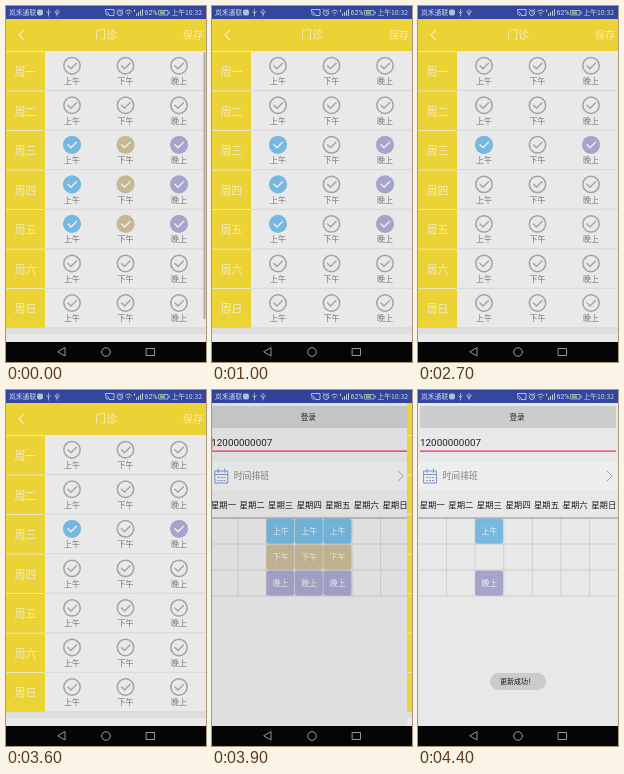
These frames come from a looping animation (200 px wide and 356 px high, 4.5 s). An HTML page:

```html
<!DOCTYPE html>
<html lang="zh-CN">
<head>
<meta charset="utf-8">
<title>门诊</title>
<style>
  html, body { margin: 0; width: 100%; height: 100%; overflow: hidden; background: #000; }
  svg { display: block; width: 100vw; height: 100vh; }
  text { font-family: "Noto Sans CJK SC", "Noto Sans CJK", "Noto Sans", sans-serif; }
  .latin { font-family: Roboto, sans-serif; }
  .line { fill: none; stroke-linecap: round; stroke-linejoin: round; }
</style>
</head>
<body>
<svg id="stage" viewBox="0 0 200 356"></svg>
<script>
const LOOP = 4500, STEP = 100;
const DAYS = [...'一二三四五六日'];
const PARTS = ['上午', '下午', '晚上'];
const COLORS = ['#76b8df', '#c5b895', '#a5a5cb'];
const YELLOW = '#ecd335', PALE = '#f3ebc4', BLUE = '#33479f';

// Taps that clear a slot: time, day, part of day
const TAPS = [
  [500, 4, 1], [700, 3, 1], [900, 2, 1],
  [1300, 3, 0], [1600, 4, 0], [1900, 4, 2], [2600, 3, 2]
];
const BACK = 3800, REFRESH = 4100, TOAST = 4200;

function add(parent, tag, attrs = {}) {
  const el = document.createElementNS('http://www.w3.org/2000/svg', tag);
  for (const key in attrs) el.setAttribute(key, attrs[key]);
  return parent.appendChild(el);
}
const rect = (p, x, y, width, height, fill, rx = 0) => add(p, 'rect', { x, y, width, height, fill, rx });
const line = (p, d, stroke, width = 1) =>
  add(p, 'path', { d, stroke, 'stroke-width': width, class: 'line' });
function text(p, str, x, y, size, fill, anchor = 'middle', more = {}) {
  const el = add(p, 'text', { x, y: y + size * 0.37, 'font-size': size, fill, 'text-anchor': anchor, ...more });
  el.textContent = str;
  return el;
}
const show = (el, on) => el.setAttribute('visibility', on ? 'inherit' : 'hidden');

const stage = document.getElementById('stage');
rect(stage, 0, 0, 200, 13, BLUE);
const home = add(stage, 'g');
const scrim = rect(stage, 0, 0, 200, 336, '#000');
const page = add(stage, 'g');
const homeCells = buildHome();
const caret = rect(home, 2, 47, 1.2, 12, '#e8487a');
const checks = buildPage();
const scrollbar = rect(page, 197.5, 46, 2, 267, '#aaa');
const toast = add(stage, 'g');
rect(toast, 72, 283, 56, 17, '#cbcbcb', 8.5);
text(toast, '更新成功！', 82, 291.5, 7, '#111', 'start', { 'font-weight': 500 });
buildBars();

function buildHome() {
  rect(home, 0, 13, 200, 323, '#e8e8e8');
  rect(home, 2, 16, 196, 22, '#cccccc', 2);
  text(home, '登录', 99, 27, 7.6, '#222', 'middle', { 'font-weight': 500 });
  text(home, '12000000007', 2, 52.5, 9.9, '#222', 'start', { class: 'latin' });
  rect(home, 2, 60.4, 196, 1.5, '#ee4a7c');
  rect(home, 0, 72, 200, 28, '#eeeeee');

  line(home, 'M6 81H18.500V93H6ZM6 84.500H18.500M9 79V82.500M15.500 79V82.500', '#7b93c3', 1);
  line(home, 'M8.500 87.500H16M8.500 90.500H16', '#7b93c3', 1.2).setAttribute('stroke-dasharray', '1 2');
  text(home, '时间排班', 24.5, 86, 8.9, '#7c7e82', 'start');
  line(home, 'M189 81L194 86L189 91', '#999', 0.9);

  const col = 200 / 7;
  DAYS.forEach((day, i) =>
    text(home, '星期' + day, (i + 0.5) * col, 115, 8.4, '#1a1a1a', 'middle', { 'font-weight': 500 }));
  for (let i = 1; i < 7; i++) line(home, `M${i * col} 128V206`, '#c9c9c9', 0.8);
  for (let j = 1; j < 4; j++) line(home, `M0 ${128 + j * 26}H200`, '#c9c9c9', 0.8);
  line(home, 'M0 128H200', '#777', 0.8);

  const cells = [];
  for (let day = 2; day < 5; day++) PARTS.forEach((label, part) => {
    const g = add(home, 'g'), y = 128.5 + part * 26;
    rect(g, day * col, y, col - 0.7, 25.3, COLORS[part], 2.5);
    text(g, label, (day + 0.5) * col, y + 13, 8, '#eef0f2');
    cells.push({ g, stays: day === 2 && part !== 1 });
  });
  return cells;
}

function buildPage() {
  rect(page, 0, 0, 200, 13, BLUE);
  rect(page, 0, 13, 200, 323, '#e9e9e9');
  rect(page, 0, 13, 200, 32, YELLOW);
  line(page, 'M17.500 24.500L13 29L17.500 33.500', PALE, 1.1);
  text(page, '门诊', 100, 29, 11, PALE);
  text(page, '保存', 187, 29.5, 10, PALE);
  rect(page, 0, 322, 200, 6, '#dfdfdf');

  const list = [], pitch = 39.55;
  DAYS.forEach((day, row) => {
    const top = 45 + row * pitch, y = top + 14.7;
    rect(page, 0, top + 0.8, 39, pitch - 0.8, YELLOW);
    text(page, '周' + day, 19.5, top + 21, 10.8, PALE);
    line(page, `M39 ${top + pitch}H200`, '#d2d2d2', 0.8);
    PARTS.forEach((label, part) => {
      const x = 66 + part * 53.5;
      const dot = add(page, 'circle', { cx: x, cy: y, 'stroke-width': 1.5 });
      const tick = line(page, `M${x - 4} ${y}l3 3l5.500 -5.500`, '#999', 1.4);
      text(page, label, x, y + 15.5, 8, '#777');
      list.push({ row, part, dot, tick });
    });
  });
  return list;
}

function buildBars() {
  const white = '#d5d9ec';
  text(stage, '岚禾通联', 3, 6.7, 6.8, white, 'start');
  rect(stage, 31, 3.5, 6, 6, '#a9c5dc', 2);
  line(stage, 'M42.500 3.500V10M40.500 5.500L42.500 7.500L44.500 5.500M51 3.500V10M49 5V6.500L51 8L53 6.500V5', white, 0.7);
  line(stage, 'M99.500 5V3.500H108V9.500H104M99.500 7.500a2 2 0 0 1 2 2M99.500 5.700a4 4 0 0 1 4 4', white, 0.8);
  add(stage, 'circle', { cx: 114, cy: 6.8, r: 2.7, fill: 'none', stroke: white, 'stroke-width': 0.8 });
  line(stage, 'M114 5.300V7H115.300M111 4L112 3M117 4L116 3', white, 0.6);
  line(stage, 'M119.500 5.500Q122.500 2.500 125.500 5.500M121 7.300Q122.500 5.800 124 7.300M122.500 9V9.200', white, 0.8);
  line(stage, 'M128.500 4V5.500M130.500 9.500V8M132.500 9.500V6.500M134.500 9.500V5M136.500 9.500V3.500', white, 0.9);
  text(stage, '62%', 145, 6.6, 7, white, 'middle', { class: 'latin' });
  line(stage, 'M153 4.500H162V9H153ZM163.300 6V7.500', white, 0.7);
  rect(stage, 154, 5.4, 5, 2.7, '#68c77b');
  text(stage, '上午10:32', 196, 6.7, 6.8, white, 'end');

  rect(stage, 0, 336, 200, 20, '#050505');
  line(stage, 'M59 342V350L52 346Z', '#aaa', 0.9);
  add(stage, 'circle', { cx: 100, cy: 346, r: 4.3, fill: 'none', stroke: '#aaa', 'stroke-width': 0.9 });
  line(stage, 'M140.500 342.500H148.500V349.500H140.500Z', '#aaa', 0.9);
}

function isChecked(row, part, t) {
  if (row < 2 || row > 4) return false;
  return !TAPS.some(([at, r, p]) => r === row && p === part && t >= at);
}

function draw(t) {
  for (const { row, part, dot, tick } of checks) {
    const on = isChecked(row, part, t);
    dot.setAttribute('fill', on ? COLORS[part] : 'none');
    dot.setAttribute('stroke', on ? 'none' : '#a2a2a2');
    dot.setAttribute('r', on ? 9.1 : 8.2);
    tick.setAttribute('stroke', on ? '#eef0f2' : '#a2a2a2');
  }
  scrollbar.setAttribute('opacity', Math.max(0, Math.min(1, (1000 - t) / 400)));

  // The page slides out fast and settles; the one below follows at half speed
  const x = t < BACK ? 0 : [140, 195][(t - BACK) / STEP] ?? 200;
  const left = 200 - x;
  page.setAttribute('transform', `translate(${x} 0)`);
  home.setAttribute('transform', `translate(${-left * 0.55} 0)`);
  scrim.setAttribute('opacity', Math.min(0.6, left * 0.0076));
  show(page, left > 0);
  show(caret, t % 1000 >= 500);
  for (const { g, stays } of homeCells) show(g, stays || t < REFRESH);
  show(toast, t >= TOAST);
}

function tick(now) {
  draw(Math.floor((now % LOOP) / STEP) * STEP);
  requestAnimationFrame(tick);
}
draw(0);
requestAnimationFrame(tick);
</script>
</body>
</html>
```
